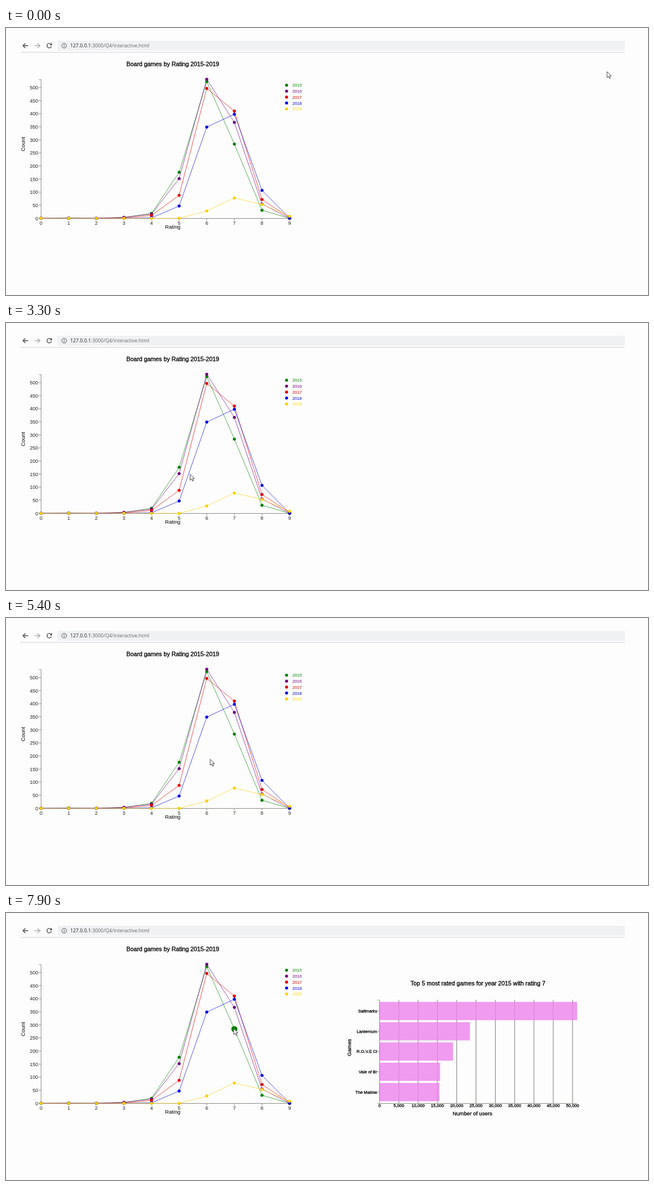
Animation of 1159 by 483 pixels, one loop 8 s. Source, as an HTML page:

```html
<!DOCTYPE html>
<html lang="en">
<head>
<meta charset="utf-8">
<title>Board games by Rating</title>
<style>
  html, body { margin: 0; width: 100%; height: 100%; overflow: hidden; background: #fdfdfd; }
  svg { display: block; width: 1159px; height: 483px; font-family: "Liberation Sans", Arial, sans-serif; }
  .title { font-size: 10.8px; stroke: #000; stroke-width: .35px; }
  .label { font-size: 9.7px; }
  .tick { font-size: 9px; fill: #222; }
  .heavy { stroke: #000; stroke-width: .3px; }
  .small { font-size: 7.7px; }
  .url { font: 8.84px "Open Sans", sans-serif; fill: #666; }
  .axis { fill: none; stroke: #8c8984; }
  .grid { fill: none; stroke: #777; }
</style>
</head>
<body>
<svg id="stage" viewBox="0 0 1159 483"></svg>
<script>
const LOOP = 8000;
const series = [
  ['2015', 'green', [0, 1, 0, 3, 19, 176, 523, 284, 31, 0]],
  ['2016', '#70007c', [0, 0, 0, 4, 16, 152, 532, 367, 55, 0]],
  ['2017', '#e60000', [0, 0, 0, 1, 11, 88, 497, 410, 72, 3]],
  ['2018', '#0000e6', [0, 0, 0, 0, 2, 47, 349, 398, 107, 1]],
  ['2019', '#f8d210', [0, 0, 0, 0, 0, 0, 28, 78, 53, 8]]
];
const panels = [
  { from: 3700, to: 5100, year: 1, rating: 5, step: 100, gap: 44.05, count: 8,
    bars: [['4 Wagons', 357], ['Who\'s Off', 278.5], ['When Did W', 270], ['Wirf mal d', 203.5], ['Tom Garvel', 200.5]] },
  { from: 6600, to: LOOP, year: 0, rating: 7, step: 5000, gap: 34.85, count: 10,
    bars: [['Saltmarks', 357], ['Lanternum', 163.5], ['R.O.V.E Cl', 133], ['Vale of Br', 109.7], ['The Mallow', 108.3]] }
];
// time, x, y of the pointer tip
const path = [[0, 1085, 79], [900, 368, 286], [2300, 439, 279], [3650, 311, 272.5], [4700, 311, 272.5],
  [5000, 359, 267], [6400, 408, 210], [6600, 411, 209], [LOOP, 411, 209]];

const range = n => [...Array(n).keys()];
const px = rating => 63.3 + rating * 49.85;
const py = count => 344.3 - count * .473;
const text = (x, y, cls, content, anchor = 'middle', extra = '') =>
  `<text x="${x}" y="${y}" class="${cls}" text-anchor="${anchor}" ${extra}>${content}</text>`;
const upright = (x, y, cls, content) =>
  text(0, 0, cls, content, 'middle', `transform="translate(${x} ${y}) rotate(-90)"`);
const dot = (x, y, fill, r = 2.75) => `<circle cx="${x}" cy="${y}" r="${r}" fill="${fill}"/>`;

function browserBar() {
  return `<rect x="93" y="23" width="1024" height="18" fill="#f0f1f2"/>
    <path d="M26 44H1117" stroke="#d0cddf"/>
    <g fill="none" stroke-width="1.3">
      <path d="M40 32H31M35 27.7L30.7 32L35 36.3" stroke="#444"/>
      <path d="M52 32H61M57 27.7L61.3 32L57 36.3" stroke="#aaa"/>
      <path d="M81.2 29.2A4.1 4.1 0 1 0 82 33.3" stroke="#444"/>
      <circle cx="105" cy="32" r="4.3" stroke="#555" stroke-width="1"/>
      <path d="M105 31.3V34.5M105 29.2V30.4" stroke="#555" stroke-width="1.1"/>
    </g><path d="M83 27V31.3H78.8Z" fill="#444"/>
    <text x="116" y="35.2" class="url"><tspan fill="#222">127.0.0.1</tspan>:3000/Q4/interactive.html</text>`;
}

function lineChart() {
  const rows = range(11).map(i => i * 50);
  const ticks = rows.map(v => `M59 ${py(v)}H63`).join('') + range(10).map(i => `M${px(i)} 344.5V348`).join('');
  return text(301, 69, 'title', 'Board games by Rating 2015-2019') +
    `<path class="axis" d="M59.5 93.3H63.3V344.5H512V348${ticks}"/>` +
    rows.map(v => text(58, py(v) + 3.3, 'tick', v, 'end')).join('') +
    range(10).map(i => text(px(i), 355.7, 'tick', i)).join('') +
    text(301, 363, 'label', 'Rating') + upright(33.5, 210, 'label', 'Count') +
    series.map(([, color, data]) => `<polyline fill="none" stroke="${color}" stroke-width=".8" stroke-opacity=".85"
      points="${data.map((v, i) => [px(i), py(v)]).join(' ')}"/>`).join('') +
    series.map(([year, color, data], k) => data.map((v, i) => dot(px(i), py(v), color)).join('') +
      dot(506.5, 103.6 + k * 10.7, color) +
      text(517, 106.4 + k * 10.7, 'small', year, 'start', `fill="${color}"`)).join('');
}

function barChart({ year, rating, step, gap, count, bars }) {
  const [name, color, data] = series[year];
  const marks = range(count + 1);
  const rowY = i => 177.3 + i * 36.65;
  return `<g class="panel">` + dot(px(rating), py(data[rating]), color, 5.5) +
    text(852, 130.5, 'title', `Top 5 most rated games for year ${name} with rating ${rating}`) +
    `<path class="grid" d="${marks.slice(1).map(i => `M${674.3 + i * gap} 157V344.5`).join('')}"/>` +
    bars.map(([label, width], i) =>
      `<rect x="674" y="${rowY(i) - 16.5}" width="${width}" height="33" fill="violet" opacity=".8"/>` +
      text(670, rowY(i) + 2.6, 'small heavy', label, 'end')).join('') +
    `<path class="axis" d="M671 157.5H674.3V344.5H1031M671 344.5H674${bars.map((_, i) => `M671 ${rowY(i)}H674`).join('')}"/>` +
    marks.map(i => text(674.3 + i * gap, 351.3, 'small heavy', (i * step).toLocaleString('en-US'))).join('') +
    text(842, 366, 'label heavy', 'Number of users') + upright(623, 243.5, 'label heavy', 'Games') + '</g>';
}

const stage = document.getElementById('stage');
stage.innerHTML = browserBar() + lineChart() + panels.map(barChart).join('') +
  `<path id="pointer" d="M0 0V10.8L2.6 8.4L4.3 12.4L6.2 11.6L4.5 7.7H7.8Z" fill="#fff" stroke="#333" stroke-width=".9"/>`;
const groups = stage.querySelectorAll('.panel');
const pointer = document.getElementById('pointer');

function draw(now) {
  const t = Math.floor(now % LOOP / 100) * 100;
  groups.forEach((group, i) =>
    group.setAttribute('display', t >= panels[i].from && t < panels[i].to ? 'inline' : 'none'));
  const next = path.findIndex(key => key[0] > t);
  const [t0, x0, y0] = path[next - 1], [t1, x1, y1] = path[next];
  const u = (t - t0) / (t1 - t0), ease = u * u * (3 - 2 * u);
  pointer.setAttribute('transform', `translate(${x0 + (x1 - x0) * ease} ${y0 + (y1 - y0) * ease})`);
  requestAnimationFrame(draw);
}
requestAnimationFrame(draw);
</script>
</body>
</html>
```
